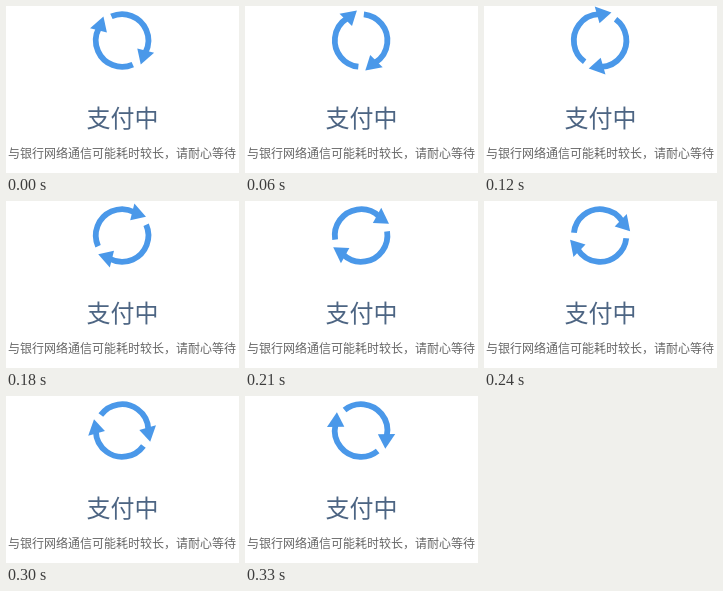
These frames come from a looping animation (233 px wide and 167 px high, 0.36 s). An HTML page with a canvas:

```html
<!DOCTYPE html>
<html lang="zh-CN">
<head>
<meta charset="utf-8">
<title>支付中</title>
<style>
html, body { margin: 0; width: 100%; height: 100%; overflow: hidden; background: #fff; }
canvas { display: block; }
</style>
</head>
<body>
<canvas id="stage" width="233" height="167"></canvas>
<script>
const ctx = document.getElementById('stage').getContext('2d');
const FONT = '"Noto Sans CJK SC", "Noto Sans CJK", sans-serif';
const STEP_MS = 30, STEPS = 12;
const CENTER = { x: 116.1, y: 34.5 };
const rad = degrees => degrees * Math.PI / 180;
const start = performance.now();

function label(text, size, color, x, y) {
  ctx.font = `${size}px ${FONT}`;
  ctx.fillStyle = color;
  ctx.fillText(text, x, y);
}

function polarPoint(radius, degrees) {
  return [radius * Math.cos(rad(degrees)), radius * Math.sin(rad(degrees))];
}

// One curved arrow, pointing clockwise, with its tip at 232 degrees.
function arrow() {
  ctx.beginPath();
  ctx.arc(0, 0, 26.3, rad(66), rad(208));
  ctx.stroke();
  ctx.beginPath();
  ctx.moveTo(...polarPoint(34.3, 201));
  ctx.lineTo(...polarPoint(30.3, 232));
  ctx.lineTo(...polarPoint(17.2, 208));
  ctx.fill();
}

function draw(now) {
  const elapsed = Math.max(0, now - start);
  const step = Math.floor(elapsed / STEP_MS) % STEPS;
  ctx.fillStyle = '#fff';
  ctx.fillRect(0, 0, 233, 167);

  ctx.save();
  ctx.translate(CENTER.x, CENTER.y);
  ctx.rotate(rad(step * 180 / STEPS));
  ctx.fillStyle = ctx.strokeStyle = '#4a98e9';
  ctx.lineWidth = 5.8;
  arrow();
  ctx.rotate(Math.PI);
  arrow();
  ctx.restore();

  label('支付中', 24, '#4d6583', 80.5, 121);
  label('与银行网络通信可能耗时较长，请耐心等待', 12, '#666', 2, 152);
  requestAnimationFrame(draw);
}

draw(start);
</script>
</body>
</html>
```
